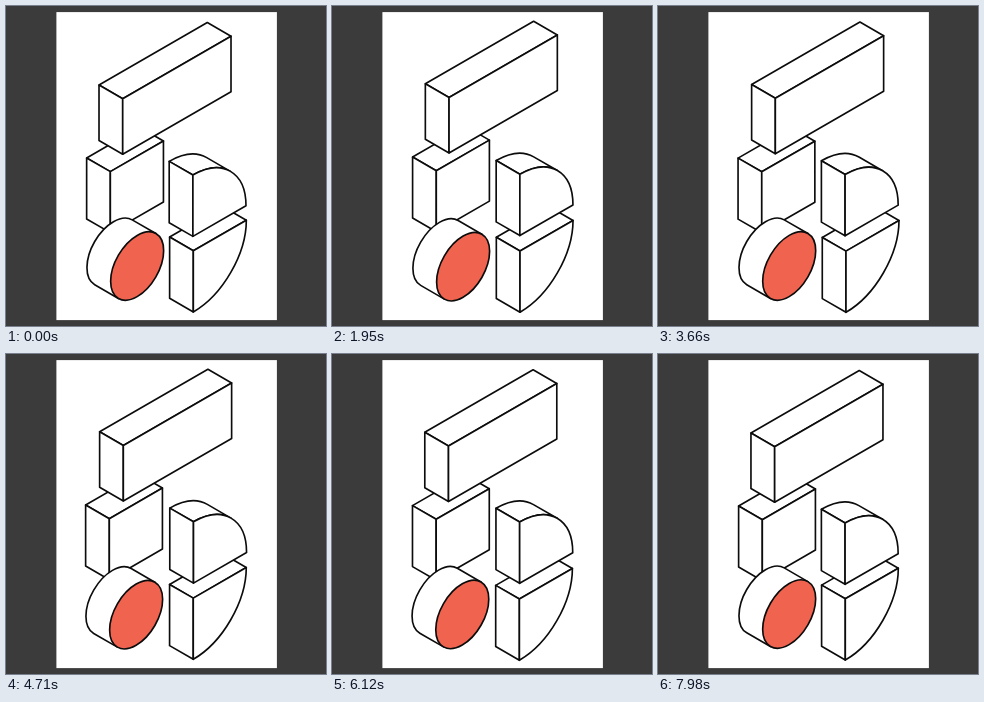
An HTML page for the animation above (8 s loop, 320 by 320 pixels).

```html
<!DOCTYPE html>
<html lang="en">
<head>
<meta charset="utf-8">
<title>Trembling blocks</title>
<style>
  html, body { margin: 0; width: 100%; height: 100%; overflow: hidden; background: #3b3b3b; }
  svg { display: block; width: 100vw; height: 100vh; }
  path, ellipse { fill: #fff; stroke: #0c0c0c; stroke-width: 1.65; stroke-linejoin: round; }
  .red { fill: #f0634f; }
</style>
</head>
<body>
<svg id="stage" viewBox="0 0 320 320">
  <rect x="50.4" y="6.1" width="220.5" height="308" fill="#fff"/>
</svg>
<script>
const stage = document.getElementById('stage');
const LOOP = 8000, STEP = 30, KNOT = 80, REACH = 0.75;
const DX = 23.7, DY = 13.7;    // depth of every block, up and to the left
const SLOPE = 1 / Math.sqrt(3); // isometric edges
const parts = [];

function addPart(markup) {
  const group = document.createElementNS('http://www.w3.org/2000/svg', 'g');
  group.innerHTML = markup;
  stage.append(group);
  parts.push(group);
}

const path = d => `<path d="${d}"/>`;

// Left side of a block whose front left edge starts at (x, y)
const side = (x, y, h) => path(`M${x} ${y}v${h}l${-DX} ${-DY}v${-h}z`);

// (x, y) is the top left corner of the front face
function box(x, y, w, h) {
  const rise = w * SLOPE;
  addPart(
    path(`M${x} ${y}l${-DX} ${-DY}l${w} ${-rise}l${DX} ${DY}z`) +
    side(x, y, h) +
    path(`M${x} ${y}l${w} ${-rise}v${h}l${-w} ${rise}z`));
}

// Projection of a circle of radius r onto the front plane
const radii = r => [r * Math.sqrt(1.5), r * Math.SQRT1_2];
const arc = (r, sweep, x, y) => `A${radii(r)} -60 0 ${sweep} ${x} ${y}`;
// Offset from the centre to the upper end of the long axis
const tip = r => [radii(r)[0] / 2, -radii(r)[0] * Math.sqrt(0.75)];

function lowerQuarter(x, y, r) {
  const w = r * Math.sqrt(0.75), rise = r / 2;
  addPart(
    path(`M${x} ${y}l${-DX} ${-DY}l${w} ${-rise}l${DX} ${DY}z`) +
    side(x, y, r) +
    path(`M${x} ${y}L${x + w} ${y - rise}${arc(r, 1, x, y + r)}z`));
}

function upperQuarter(x, y, r) {
  const w = r * Math.sqrt(0.75), rise = r / 2, [tx, ty] = tip(r);
  addPart(
    path(`M${x} ${y - r}l${-DX} ${-DY}${arc(r, 1, x + tx - DX, y + ty - DY)}l${DX} ${DY}${arc(r, 0, x, y - r)}z`) +
    side(x, y - r, r) +
    path(`M${x} ${y}V${y - r}${arc(r, 1, x + w, y - rise)}z`));
}

function cylinder(x, y, r) {
  const [tx, ty] = tip(r), [rx, ry] = radii(r);
  addPart(
    path(`M${x + tx} ${y + ty}l${-DX} ${-DY}${arc(r, 0, x - tx - DX, y - ty - DY)}l${DX} ${DY}z`) +
    `<ellipse class="red" rx="${rx}" ry="${ry}" transform="translate(${x} ${y}) rotate(-60)"/>`);
}

box(103.7, 165.2, 53.1, 61);
box(116.7, 92, 108.3, 55.5);
lowerQuarter(187.6, 244.8, 61.2);
upperQuarter(187.6, 229.7, 61.3);
cylinder(130.8, 260.3, 30.6);

// Seeded value between -1 and 1
function random(seed) {
  const s = Math.sin(seed * 127.1 + 11.7) * 43758.5453;
  return (s - Math.floor(s)) * 2 - 1;
}

function wiggle(t, channel) {
  const count = LOOP / KNOT;
  const k = Math.floor(t / KNOT), f = t / KNOT - k;
  const ease = f * f * (3 - 2 * f);
  const a = random(k + channel * 1000);
  const b = random((k + 1) % count + channel * 1000);
  return (a + (b - a) * ease) * REACH;
}

function draw(now) {
  const t = Math.floor((now % LOOP) / STEP) * STEP;
  parts.forEach((part, i) => {
    const x = wiggle(t, 2 * i + 1), y = wiggle(t, 2 * i + 2);
    part.setAttribute('transform', `translate(${x.toFixed(3)} ${y.toFixed(3)})`);
  });
}

const start = performance.now();
function tick() {
  draw(performance.now() - start);
  requestAnimationFrame(tick);
}
tick();
</script>
</body>
</html>
```
